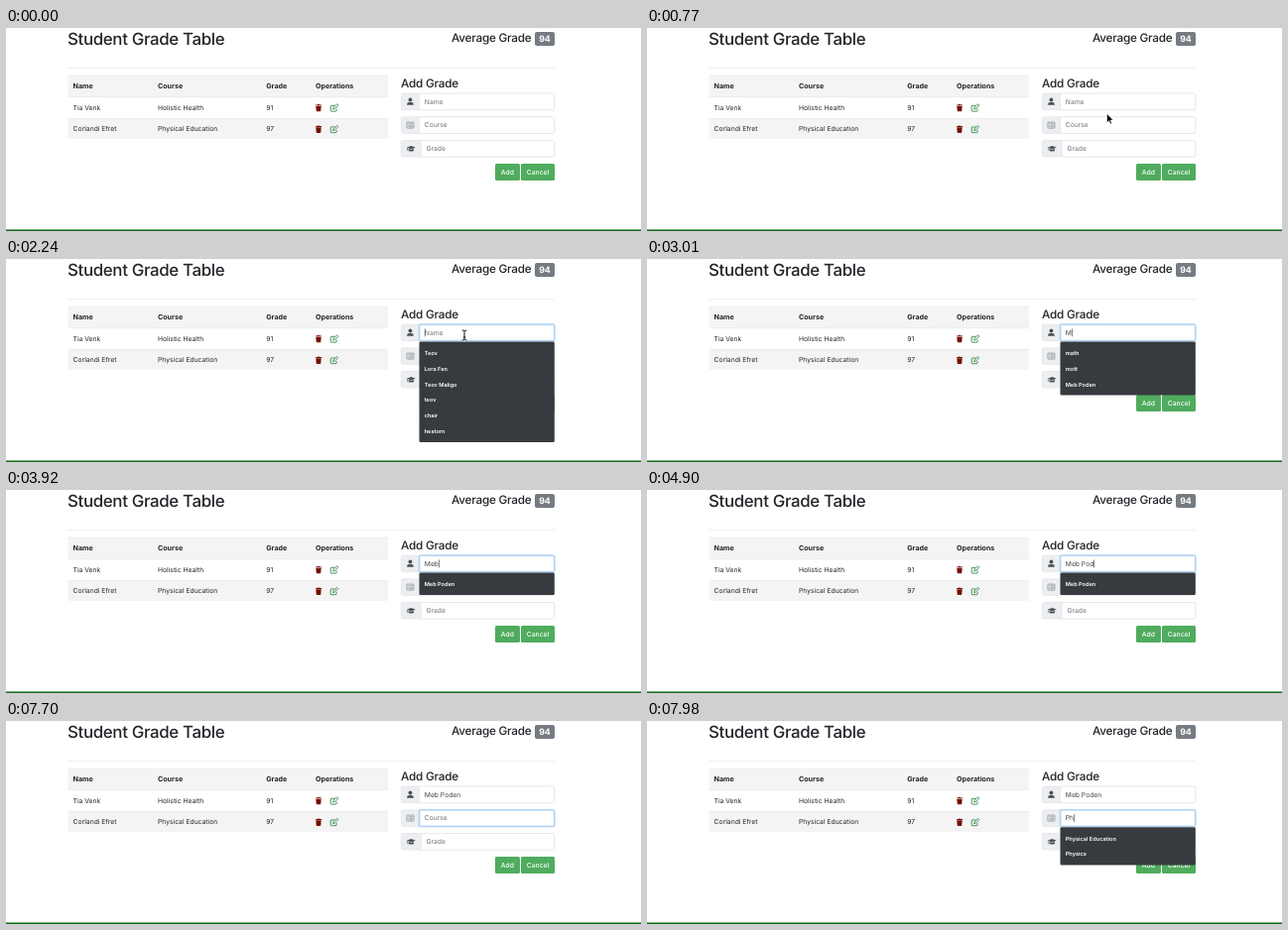
Animation of 640 by 205 pixels, one loop 8000 ms. Source, as an HTML page:

```html
<!DOCTYPE html>
<html lang="en">
<head>
<meta charset="utf-8">
<title>Student Grade Table</title>
<style>
  html, body { margin: 0; width: 100%; height: 100%; overflow: hidden; background: #fff; }
  svg { display: block; width: 640px; height: 205px; }
  text { font: 6.75px Inter, "Liberation Sans", sans-serif; fill: #212529; text-rendering: geometricPrecision; }
  .title { font-size: 16.85px; font-weight: 500; letter-spacing: -.02em; }
  .heading { font-size: 11.75px; font-weight: 500; letter-spacing: -.02em; }
  .badge { font-size: 8.8px; font-weight: 700; fill: #fff; text-anchor: middle; }
  .head { font-size: 7.1px; font-weight: 700; }
  .button { font-weight: 500; fill: #fff; text-anchor: middle; }
  .hint { fill: #6c757d; }
  .value { fill: #40464c; }
  .option { font-size: 5.6px; font-weight: 600; fill: #fff; }
  .line { fill: none; stroke: #e6e8ea; stroke-width: .7; }
  .box { stroke: #dde1e5; stroke-width: .6; }
</style>
</head>
<body>
<svg viewBox="0 0 640 205">
  <defs>
    <g id="trash" fill="#7d1409">
      <path d="M-3.1-3.2h2l.4-.6h1.4l.4.6h2v.9h-5.8z"/>
      <path d="M-2.7-1.9h5.4l-.4 4.9q0 .7-.7.7h-3.2q-.7 0-.7-.7z"/>
      <path d="M-1.2-.9v3.5M0-.9v3.5M1.2-.9v3.5" stroke="#5d0b05" stroke-width=".5"/>
    </g>
    <g id="edit" fill="none" stroke="#1d7a35" stroke-width=".8" stroke-linejoin="round">
      <path d="M.5-2.3h-3.4q-.7 0-.7.7v4.4q0 .7.7.7h4.5q.7 0 .7-.7v-2"/>
      <path d="M-1.2 1.3l.3-1.5 3.6-3.6 1.3 1.3-3.6 3.6z"/>
    </g>
    <g id="user" fill="#495057">
      <circle cy="-1.8" r="1.9"/>
      <path d="M-3.3 3.5v-.8q0-2.1 2.1-2.1h2.4q2.1 0 2.1 2.1v.8z"/>
    </g>
    <g id="list" fill="none" stroke="#6a7178" stroke-width=".6">
      <rect x="-3.5" y="-2.9" width="7" height="6" rx=".6"/>
      <path d="M-2.4-1.3h.8m.7 0h3.2M-2.4.2h.8m.7 0h3.2M-2.4 1.7h.8m.7 0h3.2"/>
    </g>
    <g id="cap" fill="#495057">
      <path d="M-4.5-1L0-2.7 4.5-1 0 .7z"/>
      <path d="M-2.5.3L0 1.3 2.5.3l.3 1.9q-2.8 1.3-5.6 0z"/>
      <path d="M-3.9-.7v2.9" stroke="#495057" stroke-width=".6"/>
    </g>
    <path id="stem" d="M-2.3-5Q0-5 0-3.8V3.8Q0 5-2.3 5M2.3-5Q0-5 0-3.8M0 3.8Q0 5 2.3 5M-1.2 2h2.4"/>
  </defs>

  <text class="title" x="62" y="17.4">Student Grade Table</text>
  <text class="heading" x="449" y="14.4">Average Grade</text>
  <rect x="533" y="4" width="20" height="14" rx="2" fill="#757b82"/>
  <text class="badge" x="543" y="14.4">94</text>
  <path d="M62.5 40.5H553" class="line"/>

  <path d="M62.5 48.2H385v21.6H62.5zM62.5 91.4H385v20.6H62.5z" fill="#f4f4f4"/>
  <path d="M62.5 48.2H385M62.5 69.7H385M62.5 91.4H385" class="line"/>
  <g id="table"></g>

  <text class="heading" x="398" y="59.6">Add Grade</text>
  <g id="form"></g>
  <g fill="#4fac5e">
    <rect x="493" y="137" width="25" height="17" rx="1.5"/>
    <rect x="519" y="137" width="34" height="17" rx="1.5"/>
  </g>
  <text class="button" x="505.4" y="148">Add</text>
  <text class="button" x="536" y="148">Cancel</text>

  <rect id="caret" width=".6" height="8" fill="#333"/>
  <g id="menu"></g>
  <path id="arrow" d="M0 0v9.2l2.1-2 1.4 3.2 1.5-.6-1.4-3.2h2.9z" fill="#000" stroke="#fff" stroke-width=".6"/>
  <g id="beam" fill="none">
    <use href="#stem" stroke="#fff" stroke-width="2"/>
    <use href="#stem" stroke="#111"/>
  </g>
  <rect y="203.5" width="640" height="1.5" fill="#0b6a10"/>
</svg>

<script>
const LOOP = 8000;
const $ = id => document.getElementById(id);

function add(parent, tag, attrs, content = '') {
  const node = document.createElementNS('http://www.w3.org/2000/svg', tag);
  for (const key in attrs) node.setAttribute(key, attrs[key]);
  node.textContent = content;
  return parent.appendChild(node);
}

const columns = [67.6, 153, 262.3, 312];
const rows = [
  ['Name', 'Course', 'Grade', 'Operations'],
  ['Tia Venk', 'Holistic Health', '91'],
  ['Corlandi Efret', 'Physical Education', '97']
];
rows.forEach((row, r) => {
  const y = [61.4, 82.8, 104.4][r];
  row.forEach((label, c) => add($('table'), 'text', { x: columns[c], y, class: r ? '' : 'head' }, label));
  if (!r) return;
  add($('table'), 'use', { href: '#trash', x: 315, y: y - 2.2 });
  add($('table'), 'use', { href: '#edit', x: 330.8, y: y - 2.2 });
});

function makeField(label, icon, top, split) {
  const form = $('form'), y = top + 10.6, x = split + 5.2;
  add(form, 'rect', { class: 'box', x: 398.3, y: top, width: 154.4, height: 16.6, rx: 1.8, fill: '#eceef1' });
  add(form, 'path', { class: 'box', d: `M${split} ${top}H551q1.7 0 1.7 1.7v13.2q0 1.7-1.7 1.7H${split}z`, fill: '#fff' });
  add(form, 'use', { href: icon, x: (398.3 + split) / 2, y: top + 8.2 });
  const ring = add(form, 'g', { fill: 'none', opacity: 0 });
  const frame = { x: split, y: top, width: 552.7 - split, height: 16.6, rx: 1.5 };
  add(ring, 'rect', { ...frame, stroke: '#007bff', 'stroke-opacity': .13, 'stroke-width': 2.2 });
  add(ring, 'rect', { ...frame, stroke: '#a3cbf2', 'stroke-width': .7 });
  return {
    x, top, ring,
    hint: add(form, 'text', { class: 'hint', x, y }, label),
    value: add(form, 'text', { class: 'value', x, y })
  };
}
const nameField = makeField('Name', '#user', 66.1, 416.6);
const courseField = makeField('Course', '#list', 89.8, 416.6);
makeField('Grade', '#cap', 113.5, 418.3);

const nameKeys = [2940, 3640, 3780, 4340, 4690, 4760, 4900, 5670, 5740];
const courseKeys = [7840, 7980];
const caretOff = [[0, 1190], [1715, 2205], [2800, 2940], [3500, 3640], [5460, 5670], [6300, 6790], [7280, 7840]];

// Each menu: start, end, top edge, options
const menus = [
  [1260, 3010, 83.5, ['Teov', 'Lora Fen', 'Teov Maligo', 'teov', 'chair', 'hestorn']],
  [3010, 3850, 83.5, ['math', 'mott', 'Meb Poden']],
  [3850, 5670, 83.5, ['Meb Poden']],
  [7840, 7980, 107.2, ['Physical Education', 'Physics', 'Painting', 'Pottery']],
  [7980, LOOP, 107.2, ['Physical Education', 'Physics']]
].map(([start, end, top, options]) => {
  const node = add($('menu'), 'g', {});
  add(node, 'rect', { x: 416.5, y: top, width: 136.3, height: 6.7 + 15.8 * options.length, rx: 1.3, fill: '#373b3f' });
  options.forEach((label, i) => add(node, 'text', { class: 'option', x: 421.7, y: top + 13.4 + 15.8 * i }, label));
  return { start, end, node };
});

const clamp = v => Math.min(1, Math.max(0, v));
const within = (t, a, b) => t >= a && t < b;
const show = (node, on) => node.setAttribute('visibility', on ? 'visible' : 'hidden');
const ramp = (t, start, length) => { const p = clamp((t - start) / length); return p * p * (3 - 2 * p); };

function type(field, word, keys, t) {
  const typed = word.slice(0, keys.filter(key => key <= t).length).replace(/ /g, '\u00a0');
  if (field.value.textContent !== typed) field.value.textContent = typed;
  show(field.hint, !typed);
}

function movePointer(t) {
  const p = ramp(t, 70, 840);
  const x = 482 - 20 * p, y = 205 - 128 * p;
  const overInput = [66, 90, 113.5].some(top => within(y, top, top + 16.6));
  const visible = within(t, 70, 2940);
  show($('arrow'), visible && !overInput);
  show($('beam'), visible && overInput);
  for (const id of ['arrow', 'beam']) $(id).setAttribute('transform', `translate(${x} ${y})`);
}

function render(t) {
  type(nameField, 'Meb Poden', nameKeys, t);
  type(courseField, 'Ph', courseKeys, t);
  const leave = ramp(t, 6760, 150);
  nameField.ring.setAttribute('opacity', ramp(t, 1220, 110) * (1 - leave));
  courseField.ring.setAttribute('opacity', leave);

  const active = t < 6790 ? nameField : courseField;
  const width = active.value.textContent ? active.value.getComputedTextLength() : 0;
  $('caret').setAttribute('x', active.x + width + .1);
  $('caret').setAttribute('y', active.top + 4.3);
  show($('caret'), !caretOff.some(([a, b]) => within(t, a, b)));

  menus.forEach(menu => show(menu.node, within(t, menu.start, menu.end)));
  movePointer(t);
}

let origin;
function tick(now) {
  origin ??= now;
  render((now - origin) % LOOP);
  requestAnimationFrame(tick);
}
render(0);
requestAnimationFrame(tick);
</script>
</body>
</html>
```
